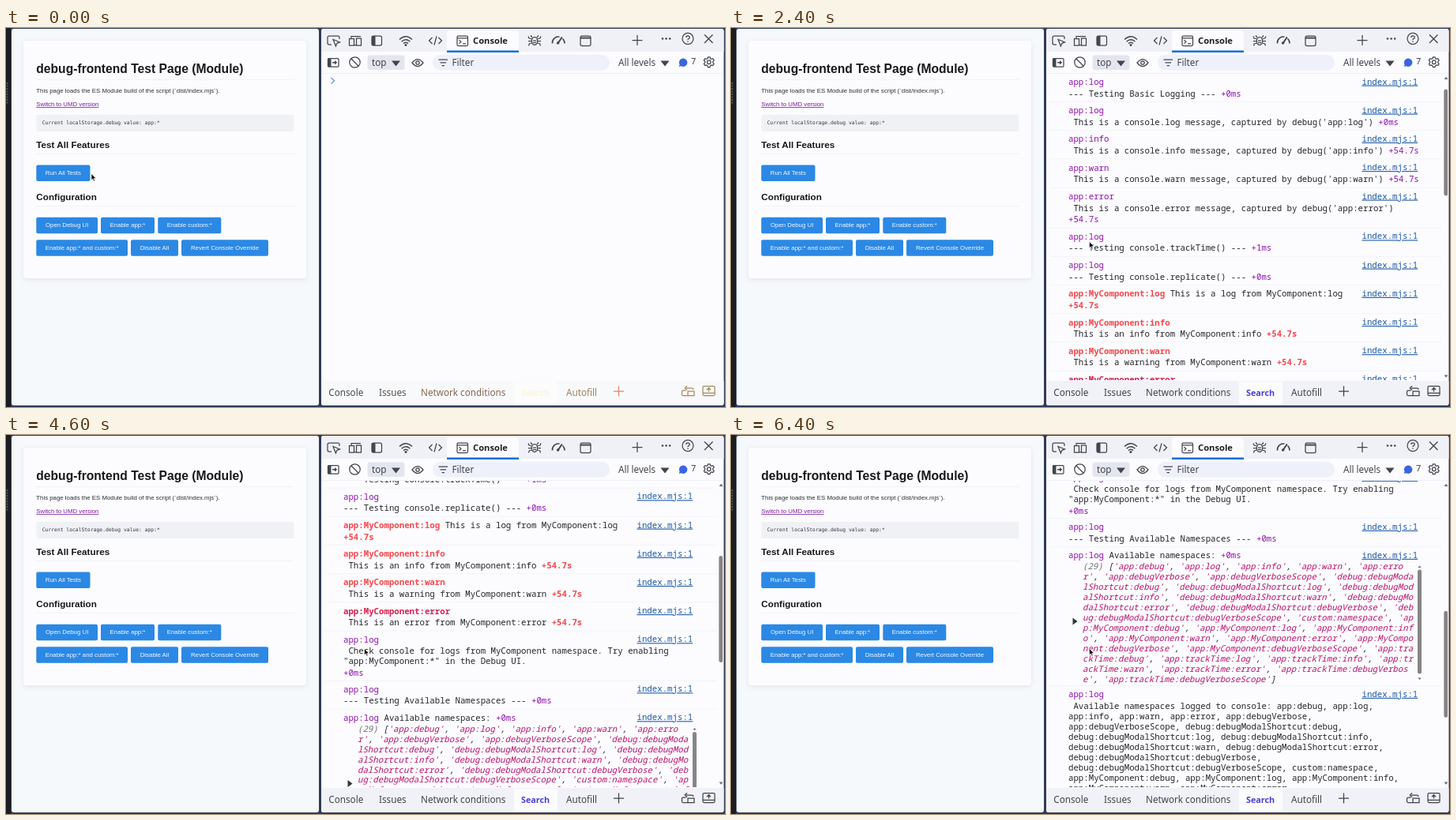
Write an HTML page that moves like this. It is 910 px wide and 480 px high and loops after 6.6 s.

```html
<!DOCTYPE html>
<html lang="en">
<head>
<meta charset="utf-8">
<title>Console demo</title>
<style>
html, body { margin: 0; width: 100%; height: 100%; overflow: hidden; background: #2f3b58; }
svg { display: block; }
text { white-space: pre; }
.page { font-family: "Liberation Sans", Arial, sans-serif; font-size: 7.83px; fill: #2c2f33; }
.page .h1 { font-size: 15.65px; font-weight: bold; fill: #16181c; }
.page .h2 { font-size: 11.7px; font-weight: bold; fill: #16181c; }
.page .code { font-family: "DejaVu Sans Mono", monospace; font-size: 6.35px; fill: #33363c; }
.page .btn { fill: #f4f9ff; text-anchor: middle; }
.ui { font-family: "Noto Sans", "Open Sans", sans-serif; font-size: 11.7px; fill: #40434a; }
.ui .on { font-size: 11.2px; font-weight: bold; fill: #1d1f24; }
.log { font-family: "Noto Sans Mono", monospace; font-size: 10.73px; fill: #24262b; }
.log .link { fill: #1b58a8; text-decoration: underline; }
.ico { fill: none; stroke: #43464d; stroke-width: 1.25; }
.solid { fill: #43464d; stroke: none; }
</style>
</head>
<body>
<svg id="stage" width="910" height="480" viewBox="0 0 910 480">
  <defs>
    <clipPath id="view"><rect x="400" y="58" width="507" height="388"/></clipPath>
    <filter id="soft" x="-10%" y="-10%" width="120%" height="120%"><feGaussianBlur stdDeviation="3"/></filter>
  </defs>
  <rect width="910" height="480" fill="#2f3b58"/>
  <rect width="6" height="480" fill="#1c1d20"/>
  <path d="M1.5 69V96" stroke="#55575c" stroke-width="2" stroke-dasharray="2 1.5"/>
  <rect x="7" y="1" width="389" height="477" rx="3" fill="#f6f9fb"/>
  <rect x="22" y="17" width="358" height="302" rx="4" fill="#c9d0da" opacity=".5" filter="url(#soft)"/>
  <rect x="22" y="16" width="358" height="301" rx="4" fill="#fcfcff"/>
  <g id="page" class="page"></g>

  <rect x="399" y="1" width="509.5" height="477" rx="3" fill="#fcfcff"/>
  <path d="M399 30V4q0-3 3-3H905.5q3 0 3 3V30z" fill="#f0f1f7"/>
  <path d="M558 30V7q0-4 4-4H645q4 0 4 4V30z" fill="#fcfcff"/>
  <rect x="558" y="28.5" width="91" height="2.5" fill="#0f6fd8"/>
  <rect x="457.5" y="34.5" width="47" height="18.5" rx="3" fill="#e3e6ee"/>
  <rect x="540" y="34" width="224" height="19.5" rx="9.5" fill="#eef1fa"/>
  <path d="M399 57.5H908" stroke="#eff1f8"/>

  <g class="ico">
    <path d="M412 21H409q-2 0-2-2V12q0-2 2-2H420q2 0 2 2V14"/>
    <path d="M414 14.5l8.5 3.4-3.6 1.4-1.5 3.7z"/>
    <path d="M437 13V10.5H449M434.5 13.5H440.5V22H434.5zM443.5 13H449.5V22H443.5zM441 21.5H443"/>
    <rect x="463" y="10" width="12.5" height="12" rx="2"/>
    <path class="solid" d="M463 10H467.5V22H463z"/>
    <path d="M498 14.5q8-7.5 16 0M500.6 17.2q5.4-5 10.8 0M503 19.6q3-2.6 6 0" stroke-width="1.5"/>
    <circle class="solid" cx="506" cy="21.5" r="1.5"/>
    <path d="M539.5 12l-4 4 4 4M547.5 12l4 4-4 4M545 10.5l-3 11"/>
    <rect x="571" y="10" width="13.5" height="12.5" rx="1.5"/>
    <path d="M571 12.8H584.5M573.5 15.2l2.4 2.2-2.4 2.2M578 19.8H582"/>
    <ellipse cx="669" cy="16.5" rx="3.6" ry="5"/>
    <path d="M666 12l-2-2.5M672 12l2-2.5M661 10.5l1 2.5 3.5 1M677 10.5l-1 2.5-3.5 1M661 16.5H665.4M677 16.5H672.6M661.5 22.5l.8-2.5 3.4-1M676.5 22.5l-.8-2.5-3.4-1M667 16H671M667 18.5H671"/>
    <path d="M691.5 19.5a7.6 7.6 0 0 1 9-8.3M704.5 13.5a7.6 7.6 0 0 1 2.5 6" stroke-width="1.6"/>
    <path d="M698.8 19l5-7.5" stroke-width="2"/><circle class="solid" cx="698.6" cy="19" r="1.8"/>
    <rect x="727" y="10" width="13" height="12.5" rx="2"/><path d="M727 12.6H740" stroke-width="2"/>
    <path d="M792.5 15.5H805.5M799 9V22"/>
    <g class="solid"><circle cx="831" cy="13.5" r="1.3"/><circle cx="835.6" cy="13.5" r="1.3"/><circle cx="840.2" cy="13.5" r="1.3"/></g>
    <circle cx="863" cy="13.5" r="7"/>
    <path d="M860.8 12q0-2.2 2.2-2.2t2.2 2q0 1.2-1.2 1.8t-1 1.6M863 16.6V18"/>
    <path d="M884 8.5l10.5 10.5M894.5 8.5L884 19" stroke-width="1.4"/>

    <rect x="407.5" y="38.5" width="13.5" height="10.5" rx="1"/>
    <path class="solid" d="M407.5 38.5H411.5V49H407.5z"/>
    <path class="solid" d="M413 43H416V41l3.2 2.8-3.2 2.8V44.6H413z"/>
    <circle cx="441.5" cy="43.5" r="6.7"/><path d="M436.8 38.8l9.4 9.4"/>
    <path class="solid" d="M488 41.5H499L493.5 48.5zM828.5 41.5H839.5L834 48.5z"/>
    <path d="M514 44q7-9 14 0q-7 9-14 0z"/><circle cx="521" cy="44" r="2.2"/>
    <path d="M547.5 40H559M549.5 43.8H557M551.6 47.5H555"/>
    <path d="M888 38.5l.4-1.7h2.6l.4 1.7 1.6.8 1.7-.6 1.4 2.3-1.3 1.2v1.9l1.3 1.2-1.4 2.3-1.7-.6-1.6.9-.4 1.8h-2.6l-.4-1.8-1.6-.9-1.7.6-1.4-2.3 1.3-1.2v-1.9l-1.3-1.2 1.4-2.3 1.7.6z"/>
    <circle cx="889.7" cy="43.2" r="2.3"/>
  </g>
  <path d="M857 38.5a5.2 5.2 0 1 1-2.3 9.8l-3 .8.9-2.8A5.2 5.2 0 0 1 857 38.5z" fill="#3b66e0"/>
  <g class="ui">
    <text class="on" x="591" y="20">Console</text>
    <text x="463" y="47.5">top</text>
    <text x="564.5" y="47.5">Filter</text>
    <text x="775" y="47.5">All levels</text>
    <text x="867" y="46" font-size="11">7</text>
  </g>

  <g clip-path="url(#view)">
    <path id="prompt" d="M411.5 63l4 3.8-4 3.8" fill="none" stroke="#5f8fe0" stroke-width="1.2"/>
    <g id="log" class="log"></g>
    <g id="bar">
      <path d="M902.5 65h5l-2.5-3.2zM902.5 439.5h5l-2.5 3.2z" fill="#6d6f75"/>
      <rect id="thumb" x="902.3" y="69" width="4.8" height="135" rx="2.4" fill="#8b8280"/>
    </g>
  </g>

  <g id="drawer" class="ui"></g>
  <path id="cursor" d="M0 0V8.2l1.9-1.7 1.3 3 1.4-.6-1.3-2.9H6z" fill="#111" stroke="#fff" stroke-width=".6"/>
</svg>
<script>
const LOOP = 6600, STEP = 200, SHOWN = 800;
const $ = id => document.getElementById(id);

function add(parent, tag, attrs, text) {
  const el = document.createElementNS("http://www.w3.org/2000/svg", tag);
  for (const k in attrs) el.setAttribute(k, attrs[k]);
  if (text !== undefined) el.textContent = text;
  parent.appendChild(el);
  return el;
}

// Web page on the left
const page = $("page");
const label = (cls, y, s, x = 38.3) => add(page, "text", { class: cls, x, y }, s);
const rule = y => add(page, "path", { d: `M38 ${y}H364.5`, stroke: "#f0f2f6" });
function button(x, y, w, s) {
  add(page, "rect", { x, y, width: w, height: 20.5, rx: 2, fill: "#2b88e4" });
  label("btn", y + 12.6, s, x + w / 2);
}
label("h1", 56.5, "debug-frontend Test Page (Module)");
rule(65.5);
label("", 82, "This page loads the ES Module build of the script (`dist/index.mjs`).");
add(page, "text", { x: 38.3, y: 99, fill: "#7a1a9a", "text-decoration": "underline" }, "Switch to UMD version");
add(page, "rect", { x: 38.5, y: 110, width: 326, height: 21, rx: 2, fill: "#eff1f5" });
label("code", 122.3, "Current localStorage.debug value: app:*", 45.8);
label("h2", 152, "Test All Features");
rule(159.5);
button(38.3, 173.5, 68.2, "Run All Tests");
label("h2", 218.3, "Configuration");
rule(225.5);
button(38.3, 239.8, 77.7, "Open Debug UI");
button(120, 239.8, 68, "Enable app:*");
button(192.3, 239.8, 80, "Enable custom:*");
button(38.3, 268.2, 115.7, "Enable app:* and custom:*");
button(158, 268.2, 60, "Disable All");
button(222, 268.2, 110, "Revert Console Override");

// Console messages
const PURPLE = "#8f10b0", RED = "#f5484c", DARK = "#24262b", STRING = "#b8126c";
const log = $("log");

function line(x, y, parts, attrs = {}) {
  const t = add(log, "text", { x, y: y + 3.8, ...attrs });
  for (const [s, fill, weight = "normal"] of parts)
    if (s) add(t, "tspan", { fill, "font-weight": weight }, s);
}

function entry(y, ...lines) {
  const red = lines[0].startsWith("app:MyC");
  const tint = red ? RED : PURPLE;
  add(log, "path", { d: `M404 ${y - 11}H900`, stroke: "#f2f4fa" });
  add(log, "text", { class: "link", x: 798.5, y: y + 3.3 }, "index.mjs:1");
  let at = y;
  lines.forEach((s, i) => {
    if (i) at += i === 1 || s[0] === "+" ? 14.6 : 13;
    const name = i ? "" : s.match(/^\S+/)[0];
    const took = (s.match(/\+[\d.]+m?s$/) || [""])[0];
    const nameTint = name.endsWith("nt:error") ? "#d6204f" : tint;
    line(427, at, [
      [name, nameTint, red ? "bold" : "normal"],
      [s.slice(name.length, s.length - took.length), DARK],
      [took, tint, red ? "bold" : "normal"]
    ]);
  });
}

const said = (kind, ms = "+54.7s") => ` This is a console.${kind} message, captured by debug('app:${kind}') ${ms}`;
entry(71, "app:log --- Running All debug-frontend Tests --- +53.7s");
entry(93, "app:log", "--- Testing Basic Logging --- +0ms");
entry(129, "app:log", said("log", "+0ms"));
entry(165.3, "app:info", said("info"));
entry(201.5, "app:warn", said("warn"));
entry(238, "app:error", said("error", "").trimEnd(), "+54.7s");
entry(288.8, "app:log", "--- Testing console.trackTime() --- +1ms");
entry(325, "app:log", "--- Testing console.replicate() --- +0ms");
entry(361.3, "app:MyComponent:log This is a log from MyComponent:log", "+54.7s");
entry(397.5, "app:MyComponent:info", " This is an info from MyComponent:info +54.7s");
entry(433.6, "app:MyComponent:warn", " This is a warning from MyComponent:warn +54.7s");
entry(469.8, "app:MyComponent:error", " This is an error from MyComponent:error +54.7s");
entry(506, "app:log", " Check console for logs from MyComponent namespace. Try enabling",
  "\"app:MyComponent:*\" in the Debug UI.", "+0ms");
entry(569, "app:log", "--- Testing Available Namespaces --- +0ms");
entry(605, "app:log Available namespaces: +0ms");

const levels = ["debug", "log", "info", "warn", "error", "debugVerbose", "debugVerboseScope"];
const group = ns => levels.map(l => ns + ":" + l);
const names = [...group("app"), ...group("debug:debugModalShortcut"), "custom:namespace",
  ...group("app:MyComponent"), ...group("app:trackTime")];
const list = `(${names.length}) [${names.map(n => `'${n}'`).join(", ")}]`;
const shorter = { 0: 63, 10: 64 };
for (let i = 0, from = 0; from < list.length; i++) {
  const size = shorter[i] || 65;
  const parts = list.slice(from, from + size).split(/(\(\d+\) |, |[\[\]])/)
    .map(s => [s, s[0] === "(" ? "#6b6e75" : /^(, |[\[\]])$/.test(s) ? DARK : STRING]);
  line(445, 619 + i * 12.93, parts, { "font-style": "italic" });
  from += size;
}
add(log, "path", { d: "M432.5 684v9l6-4.5z", fill: "#33363c" });
add(log, "rect", { x: 869, y: 623, width: 5, height: 132, rx: 2.5, fill: "#868686" });
add(log, "path", { d: "M869.3 620.5h4.4l-2.2-2.6zM869.3 760h4.4l-2.2 2.6z", fill: "#6d6f75" });

entry(781, "app:log", " Available namespaces logged to console: app:debug, app:log,",
  "app:info, app:warn, app:error, app:debugVerbose,",
  "app:debugVerboseScope, debug:debugModalShortcut:debug,",
  "debug:debugModalShortcut:log, debug:debugModalShortcut:info,",
  "debug:debugModalShortcut:warn, debug:debugModalShortcut:error,",
  "debug:debugModalShortcut:debugVerbose,",
  "debug:debugModalShortcut:debugVerboseScope, custom:namespace,",
  "app:MyComponent:debug, app:MyComponent:log, app:MyComponent:info,",
  "app:MyComponent:warn, app:MyComponent:error,");

// Drawer: idle tint before the messages, normal tint after
const drawer = $("drawer"), tinted = [];
function tint(tag, attrs, key, idle, normal = "#40434a", text) {
  tinted.push({ el: add(drawer, tag, attrs, text), key, idle, normal });
}
const tab = (x, s, idle, normal, attrs) => tint("text", { x, y: 466, ...attrs }, "fill", idle, normal, s);
const icon = (d, idle) => tint("path", { d, fill: "none", "stroke-width": 1.25 }, "stroke", idle);

tint("path", { d: "M399 447H908.5V475q0 3-3 3H402q-3 0-3-3z" }, "fill", "#f8f9fb", "#f0f2f8");
tint("rect", { x: 643, y: 448, width: 55, height: 29 }, "fill", "#fcfcfa", "#fcfcff");
tab(408.3, "Console", "#4a4a4c");
tab(472, "Issues", "#57504a");
tab(525, "Network conditions", "#84684e");
tab(652, "Search", "#faf5dc", "#4a3fd4", { "font-weight": "bold", style: "font-size:10.8px" });
tab(709, "Autofill", "#a0805c");
icon("M769 460H782M775.5 453.5V466.5", "#e08466");
icon("M861 456H868q2 0 2 2M859 456l3-2.5M859 456l3 2.5M863 460H871V465.5H863zM860.5 459H857q-1.5 0-1.5 1.5V464q0 1.5 1.5 1.5H863", "#a48a5e");
icon("M882 455q0-1.5 1.5-1.5H895.5q1.5 0 1.5 1.5V464q0 1.5-1.5 1.5H883.5q-1.5 0-1.5-1.5zM882 462.3H897M889.5 460.5V456M887 458.2l2.5-2.5 2.5 2.5", "#a48a5e");

// Motion
const scrollKeys = [[2150, 0], [3000, 84], [3800, 164], [4600, 247], [5400, 336], [6400, 452.5]];
const moveX = [[0, 108], [400, 84], [800, 84], [1600, 453.5]];
const moveY = [[0, 184.5], [400, 184], [800, 184], [1600, 270.5]];

function at(keys, t) {
  if (t <= keys[0][0]) return keys[0][1];
  for (let i = 1; i < keys.length; i++) {
    const [t0, a] = keys[i - 1], [t1, b] = keys[i];
    if (t <= t1) return a + (b - a) * (t - t0) / (t1 - t0);
  }
  return keys[keys.length - 1][1];
}

function draw(time) {
  const t = Math.floor(time % LOOP / STEP) * STEP;
  const shown = t >= SHOWN, scroll = at(scrollKeys, t);
  $("prompt").style.display = shown ? "none" : "";
  $("log").style.display = $("bar").style.display = shown ? "" : "none";
  $("log").setAttribute("transform", `translate(0 ${-scroll})`);
  $("thumb").setAttribute("y", 69 + scroll * 0.34);
  for (const { el, key, idle, normal } of tinted) el.setAttribute(key, shown ? normal : idle);
  $("cursor").setAttribute("transform", `translate(${at(moveX, t)} ${at(moveY, t)})`);
}

const start = performance.now();
function tick() {
  draw(performance.now() - start);
  requestAnimationFrame(tick);
}
draw(0);
requestAnimationFrame(tick);
</script>
</body>
</html>
```
